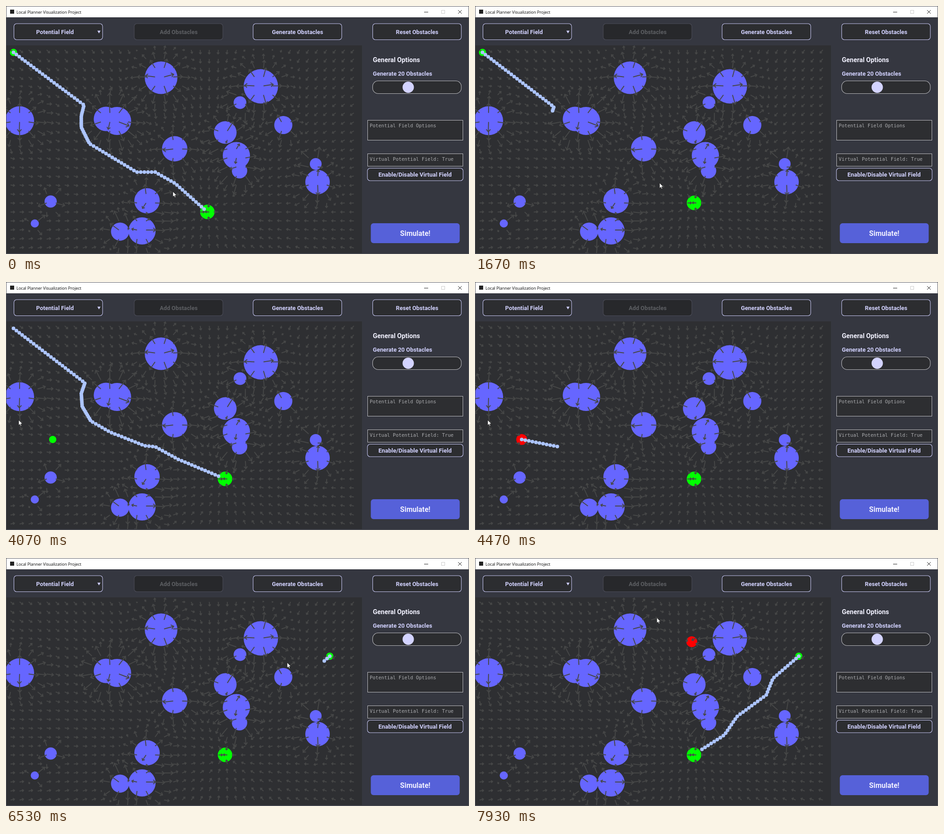
Recreate the animation shown at these times as an HTML page. Size 1021x548 px, loop 8 s.

```html
<!DOCTYPE html>
<html lang="en">
<head>
<meta charset="utf-8">
<title>Local Planner Visualization Project</title>
<style>
html, body { margin: 0; width: 100%; height: 100%; overflow: hidden; background: #353740; }
svg { display: block; width: 1021px; height: 548px; }
.btn { fill: #2c2d30; stroke: #c6c6f2; stroke-width: 1.1; }
.off { fill: #27282b; stroke: #4b4c58; }
.box { fill: #2d2e31; stroke: #bcbcc0; stroke-width: 1; }
.label { font: bold 12.8px Roboto, sans-serif; fill: #d2d2ff; }
.mid { text-anchor: middle; }
.mono { font: 10.6px "DejaVu Sans Mono", monospace; fill: #acadb0; }
</style>
</head>
<body>
<svg viewBox="0 0 1021 548">
  <defs><clipPath id="clip"><rect y="87" width="785" height="459"/></clipPath></defs>
  <rect width="1021" height="548" fill="#353740"/>
  <rect width="1021" height="25" fill="#fff"/>
  <rect x="9" y="8" width="9" height="9" fill="#222"/>
  <text x="23" y="16.5" font-family="Open Sans, sans-serif" font-size="9" fill="#000">Local Planner Visualization Project</text>
  <path d="M922 13.5h9M997 9l8 8M1005 9l-8 8" stroke="#222" fill="none"/>
  <rect x="960.5" y="9.5" width="7" height="7" fill="none" stroke="#ccc"/>

  <g id="toolbar"></g>
  <path d="M201.5 54.5h7l-3.5 6z" fill="#d2d2ff"/>

  <text class="label" x="809" y="124" style="font-size:14.4px;fill:#f2f2ff">General Options</text>
  <text class="label" x="809" y="154">Generate 20 Obstacles</text>
  <rect class="btn" x="808.5" y="165.5" width="195.5" height="28" rx="12" style="stroke:#b8b8bc"/>
  <circle cx="887" cy="179.5" r="12.5" fill="#d3d3ff"/>
  <rect class="box" x="797.5" y="252.5" width="210" height="44"/>
  <text class="mono" x="802" y="268">Potential Field Options</text>
  <rect class="box" x="797.5" y="326.5" width="210" height="27.5"/>
  <text class="mono" x="802" y="342">Virtual Potential Field: True</text>
  <rect class="btn" x="797" y="358.5" width="211" height="27.5" rx="6"/>
  <text class="label mid" x="902" y="377" style="font-size:13px">Enable/Disable Virtual Field</text>
  <rect x="804.5" y="480" width="196" height="44" rx="6" fill="#5661d9"/>
  <text class="label mid" x="902.5" y="508" style="font-size:15.7px;fill:#f0f0ff">Simulate!</text>

  <g clip-path="url(#clip)">
    <rect y="87" width="785" height="459" fill="#2e2f32"/>
    <g id="obstacles" fill="#66f"></g>
    <circle id="goal" r="16" fill="#0f0"/>
    <circle id="start" r="8" fill="#0f0"/>
    <circle id="marker" r="12" fill="#f00"/>
    <path id="field" fill="none" stroke="#464747" stroke-width="2"/>
    <path id="trail" fill="none" stroke="#adc5ff" stroke-width="8" stroke-linecap="round"/>
  </g>
  <rect x=".5" y=".5" width="1020" height="547" fill="none" stroke="#55565c"/>
  <path id="cursor" d="M0 0V11.6L2.7 9.2L4.5 13.2L6.3 12.4L4.6 8.5H8.2Z" fill="#fff" stroke="#111" stroke-width=".7"/>
</svg>
<script>
const LOOP = 8000, STEP = 1000 / 15, DOT_RATE = 0.0404, GAP = 8;
const el = id => document.getElementById(id);

const captions = ['Potential Field', 'Add Obstacles', 'Generate Obstacles', 'Reset Obstacles'];
el('toolbar').innerHTML = captions.map((text, i) => {
  const x = 17.5 + 263.7 * i + (i === 1 ? 1.5 : 0), off = i === 1;
  return `<rect class="btn ${off ? 'off' : ''}" x="${x}" y="39" width="195.5" height="35.5" rx="6"/>
    <text class="label mid" x="${x + (i ? 98 : 90.5)}" y="61.5" ${off ? 'style="fill:#5d5f63"' : ''}>${text}</text>`;
}).join('');

// x, y, radius
const obstacles = [
  [342, 158.5, 36], [562, 177.5, 38], [516, 213.5, 14], [483.5, 279.5, 25], [611.5, 263, 20],
  [372, 315.5, 28], [508, 330.5, 30], [515, 364, 17], [683, 349, 13], [687, 389, 27],
  [30, 253.5, 32], [220.5, 249.5, 27], [245, 254, 31], [98.5, 432, 13.5], [63.5, 480.5, 9],
  [311, 430.5, 28], [251.5, 498.5, 20], [300, 497, 30]
];
el('obstacles').innerHTML = obstacles.map(([x, y, r]) => `<circle cx="${x}" cy="${y}" r="${r}"/>`).join('');

// Waypoints are [x, y, dot spacing towards this point].
function dotsAlong(points) {
  const out = [points[0]];
  let left = 1;
  for (let i = 1; i < points.length; i++) {
    const [ax, ay] = points[i - 1], [bx, by, gap = GAP] = points[i];
    const len = Math.hypot(bx - ax, by - ay);
    let s = left * gap;
    for (; s <= len; s += gap) out.push([ax + (bx - ax) * s / len, ay + (by - ay) * s / len]);
    left = (s - len) / gap;
  }
  return out;
}

const home = [16.5, 102.5], left = [103, 348], right = [714, 217];
const runs = [
  [-LOOP, [home, [172, 219], [166, 243, 4], [166, 268, 4], [184, 304, 4.5], [288, 367], [329, 367], [373, 392], [437, 449]]],
  [966, [home, [174, 223], [166, 246, 4], [168, 275, 4], [187, 307, 4.5], [228, 331], [306, 362], [329, 364], [378, 391], [471, 430]]],
  [4185, [left, [270, 381], [300, 368, 6.5], [326, 364, 7], [375, 390], [474, 432]]],
  [6450, [right, [657, 266], [642, 303, 7], [578, 350], [550, 391, 7.5], [494, 427]]]
].map(([from, points]) => ({ from, dots: dotsAlong(points) }));

// Mouse moves: begin, end, x, y
const moves = [
  [70, 820, 407, 391], [1800, 2600, 384, 394], [2670, 3060, 83, 198], [3530, 3650, -59, 59],
  [3690, 4050, 28, 305], [5670, 6430, 638, 174], [6450, 6530, 620, 231], [6590, 7320, 407, 389], [7390, 7900, 401, 132]
];

function ease(t, from, to) {
  const k = Math.min(1, Math.max(0, (t - from) / (to - from)));
  return k * k * (3 - 2 * k);
}

const mix = (a, b, k) => [a[0] + (b[0] - a[0]) * k, a[1] + (b[1] - a[1]) * k];

const mouseAt = t => moves.reduce((p, [from, to, x, y]) => mix(p, [x, y], ease(t, from, to)), [368, 410]);

// Pull to the goal fades where an obstacle's push takes over.
function force(x, y, goal, boost) {
  let px = 0, py = 0, near = 0;
  for (const [ox, oy, r] of obstacles) {
    const dx = x - ox, dy = y - oy, d = Math.hypot(dx, dy) || 1;
    const w = Math.max(0, 1 - (d / (2.6 * r)) ** 2);
    near = Math.max(near, w);
    px += 22 * boost * w * dx / d;
    py += 22 * boost * w * dy / d;
  }
  const gx = goal[0] - x, gy = goal[1] - y, pull = 9 * (1 - near) / (Math.hypot(gx, gy) || 1);
  const fx = px + pull * gx, fy = py + pull * gy;
  const k = Math.min(1, 24 * boost / (Math.hypot(fx, fy) || 1));
  return [fx * k, fy * k];
}

function arrow(x, y, [fx, fy]) {
  const a = Math.atan2(fy, fx), h = 2 + Math.hypot(fx, fy) * 0.24;
  const point = (px, py) => px.toFixed(1) + ' ' + py.toFixed(1);
  const barb = b => point(x + fx - h * Math.cos(a + b), y + fy - h * Math.sin(a + b));
  const tip = point(x + fx, y + fy);
  return `M${point(x, y)}L${tip}M${barb(0.7)}L${tip}L${barb(-0.7)}`;
}

let fieldKey = '';
function drawField(goal, boost) {
  const key = goal + '|' + boost;
  if (key === fieldKey) return;
  fieldKey = key;
  let d = '';
  for (let j = 0; j < 23; j++)
    for (let i = 0; i < 39; i++) {
      const x = 10 + 19.92 * i, y = 97 + 19.9 * j;
      d += arrow(x, y, force(x, y, goal, boost));
    }
  el('field').setAttribute('d', d);
}

function place(id, p) {
  el(id).setAttribute('transform', `translate(${p[0].toFixed(2)} ${p[1].toFixed(2)})`);
}

function render(t) {
  const mouse = mouseAt(t), goal = mix([444, 455], [483, 435], ease(t, 70, 820));
  let start = home;
  if (t >= 6430) start = right;
  else if (t >= 3680) start = [mouse[0] + 75, mouse[1] + 43];
  place('cursor', mouse);
  place('goal', goal);
  place('start', start);

  const waiting = t >= 4180 && t < 5700, roaming = t >= 7390;
  el('marker').style.display = waiting || roaming ? '' : 'none';
  place('marker', waiting ? start : [mouse[0] + 77, mouse[1] + 53]);

  drawField(goal, t > 130 && t < 960 ? 1.5 : 1);

  const run = runs.filter(r => r.from <= t).pop();
  const shown = run.dots.slice(0, Math.max(1, Math.floor((t - run.from) * DOT_RATE)));
  el('trail').setAttribute('d', shown.map(([x, y]) => `M${x.toFixed(1)} ${y.toFixed(1)}h.01`).join(''));
}

let origin;
function tick(now) {
  if (origin === undefined) origin = now;
  const t = (now - origin) % LOOP;
  render(Math.floor(t / STEP + 0.1) * STEP);
  requestAnimationFrame(tick);
}
render(0);
requestAnimationFrame(tick);
</script>
</body>
</html>
```
